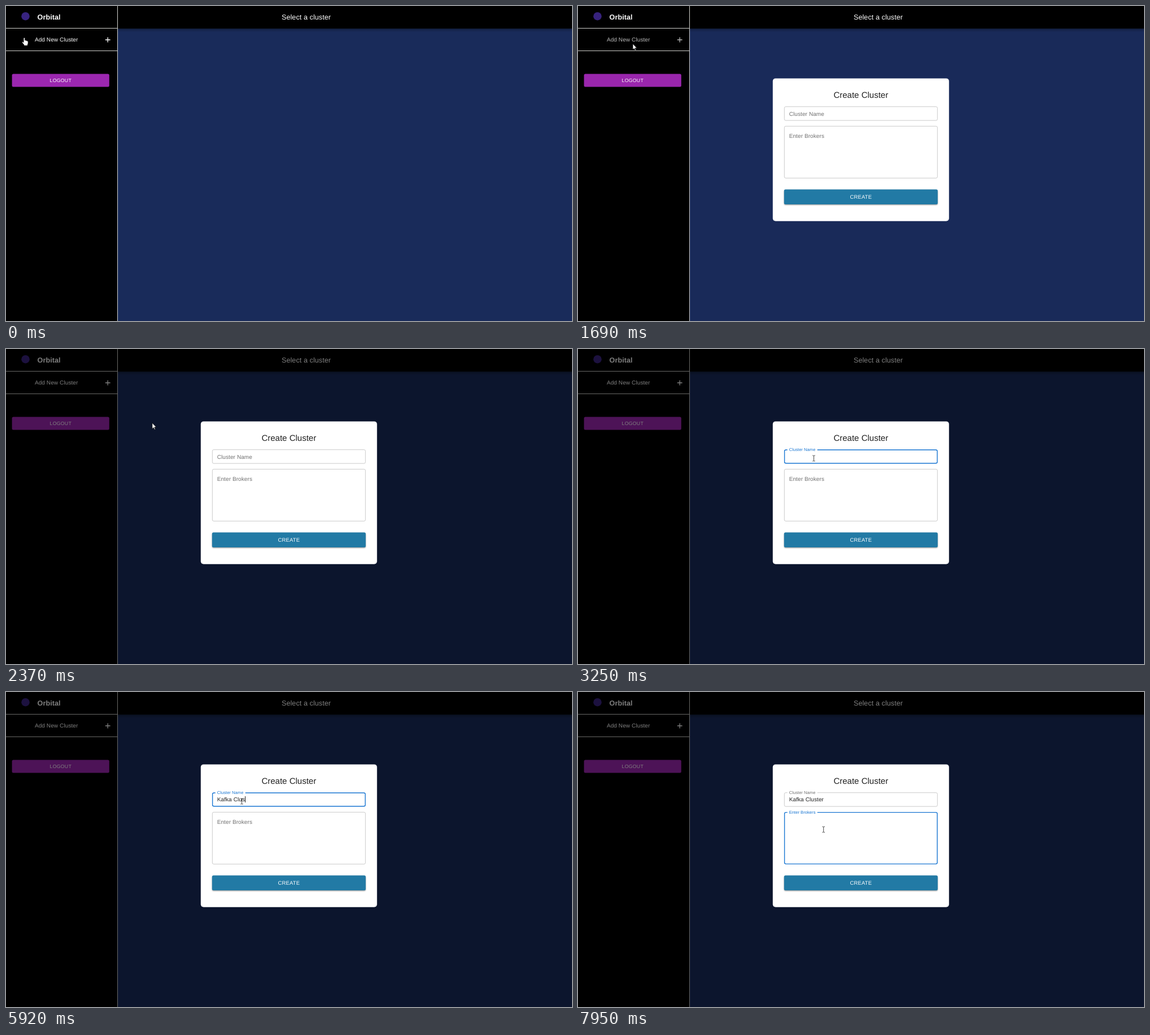
Write an HTML page that moves like this. It is 1002 px wide and 559 px high and loops after 8 s.

```html
<!DOCTYPE html>
<html lang="en">
<head>
<meta charset="utf-8">
<title>Create Cluster</title>
<style>
  html, body { margin: 0; width: 100%; height: 100%; overflow: hidden; background: #000; }
  svg { display: block; width: 1002px; height: 559px; }
  text {
    font: 10.02px "Liberation Sans", Arial, sans-serif;
    letter-spacing: .00938em;
    white-space: pre;
    text-rendering: geometricPrecision;
    fill: #fff;
  }
  .h6 { font-size: 12.52px; letter-spacing: .0075em; }
  .h5 { font-size: 15.02px; letter-spacing: 0; fill: #222; }
  .btn { font-size: 8.76px; letter-spacing: .02857em; text-anchor: middle; }
  .large { font-size: 9.39px; }
  .rule { fill: #d2d2ce; }
  .outline { fill: none; }
  .beam { fill: none; stroke: #333; stroke-width: .9; }
  .pointer { fill: #fff; stroke: #000; stroke-width: .75; stroke-linejoin: round; }
</style>
</head>
<body>
<svg viewBox="0 0 1002 559">
  <defs>
    <linearGradient id="shade" x2="0" y2="1">
      <stop offset="0" stop-opacity=".34"/>
      <stop offset=".5" stop-opacity=".1"/>
      <stop offset="1" stop-opacity="0"/>
    </linearGradient>
    <clipPath id="item"><rect y="40" width="197" height="39"/></clipPath>
    <filter id="soft" x="-5%" y="-30%" width="110%" height="170%"><feGaussianBlur stdDeviation="1"/></filter>
  </defs>

  <rect width="1002" height="559"/>
  <rect x="198" y="40" width="804" height="519" fill="#192b5a"/>
  <rect x="198" y="40" width="804" height="7" fill="url(#shade)"/>
  <rect class="rule" x="197" y="0" width="1" height="559"/>
  <rect class="rule" y="39" width="197" height="1"/>
  <rect class="rule" y="79" width="197" height="1"/>
  <circle cx="34.5" cy="18.2" r="7.3" fill="#38237f"/>
  <text class="h6" x="55.6" y="23.6" font-weight="700" style="font-weight:700">Orbital</text>
  <text class="h6" x="488" y="23.6">Select a cluster</text>
  <text x="50.9" y="63.2">Add New Cluster</text>
  <path d="M175.8 60h8.8M180.2 55.6v8.8" stroke="#fff" stroke-width="1.3"/>
  <circle id="ripple" cx="97" cy="67" clip-path="url(#item)"/>
  <rect x="10.6" y="120.5" width="172.2" height="22.9" rx="2.5" fill="#9c27b0"/>
  <text class="btn" x="96.8" y="134.9">LOGOUT</text>

  <rect id="backdrop" width="1002" height="559"/>

  <g id="modal">
    <rect x="344.8" y="128.4" width="312" height="253.4" rx="5" fill="#fff"/>
    <text class="h5" x="500.8" y="163.4" text-anchor="middle">Create Cluster</text>
    <g id="fields"></g>
    <text id="value" x="373.7" y="194.1" style="fill:#222"></text>
    <rect id="caret" width="1" height="11" fill="#222"/>
    <rect x="365" y="327" width="271.6" height="26" rx="2.5" opacity=".45" filter="url(#soft)"/>
    <rect x="364.8" y="325.6" width="272" height="26.4" rx="2.5" fill="#227aa5"/>
    <text class="btn large" x="500.9" y="342.1">CREATE</text>
  </g>

  <g id="cursor">
    <path id="hand" class="pointer" d="M-1.3 8.2V1Q-1.3 -.1 -.1 -.1T1.1 1V4.7Q1.4 4.1 2.2 4.2T3.1 5.1Q3.5 4.6 4.2 4.8T5 5.8Q5.4 5.4 6 5.6T6.7 6.6V9.6Q6.7 11 5.8 12.2V13.9H-.5V12.6L-3.7 8.6Q-4.3 7.6 -3.5 7.1T-2 7.4Z"/>
    <path id="arrow" class="pointer" d="M0 0V10.6L2.4 8.3L4 12L5.6 11.3L4 7.7H7.3Z"/>
    <path id="beam" class="beam" d="M-2.3 -5H-.6L0 -4.5L.6 -5H2.3M0 -4.5V4.5M-2.3 5H-.6L0 4.5L.6 5H2.3"/>
  </g>
</svg>

<script>
const LOOP = 8000, LEFT = 364.9, WIDTH = 271.8, TEXT_X = 373.7;
const OPEN = 1672, NAME_FOCUS = 2745, BROKERS_FOCUS = 7410, LAST_KEY = 6720;

// Bursts of screen updates: start, end, count
const BURSTS = [
  [0, 0, 1], [70, 810, 10], [1210, 1210, 1], [1350, 2110, 12],
  [2180, 2510, 6], [2710, 2990, 5], [7130, 7610, 8]
];

// Pointer path: time, x, y
const PATH = [
  [0, 32.4, 56.4], [150, 30, 46], [320, 52, 45], [560, 97, 67],
  [810, 92, 59.3], [1210, 97, 60], [1350, 97, 67], [2110, 97, 67],
  [2510, 417.5, 194], [7061, 417.5, 194], [7130, 416.6, 207], [7335, 434.7, 244]
];

const WORDS = "Kafka Cluster";
const KEYS = [3650, 3980, 4250, 4450, 4650, 4850, 5110, 5380, 5720, 5920, 6190, 6390, LAST_KEY];

const $ = id => document.getElementById(id);
const clamp = v => Math.max(0, Math.min(1, v));
const mix = (a, b, p) => a + (b - a) * p;
const show = (el, on) => { el.style.display = on ? "" : "none"; };

function set(el, attrs) {
  for (const k in attrs) el.setAttribute(k, attrs[k]);
  return el;
}

function add(tag, attrs) {
  return $("fields").appendChild(set(document.createElementNS("http://www.w3.org/2000/svg", tag), attrs));
}

function bezier(x1, y1, x2, y2) {
  const at = (a, b, u) => 3 * (1 - u) * (1 - u) * u * a + 3 * (1 - u) * u * u * b + u * u * u;
  return x => {
    x = clamp(x);
    let lo = 0, hi = 1;
    for (let i = 0; i < 20; i++) {
      const u = (lo + hi) / 2;
      if (at(x1, x2, u) < x) lo = u; else hi = u;
    }
    return at(y1, y2, hi);
  };
}
const easeInOut = bezier(.4, 0, .2, 1), easeOut = bezier(0, 0, .2, 1);

function makeField(name, top, height, baseline) {
  const outline = add("rect", { class: "outline", rx: 2.5 });
  const notch = add("rect", { x: 370.7, y: top - 1, height: 3, fill: "#fff" });
  const label = add("text", { x: TEXT_X });
  label.textContent = name;
  return {
    contains: (x, y) => x > LEFT && x < LEFT + WIDTH && y > top && y < top + height,
    draw(shrink, focused, hovered) {
      const line = focused ? 1.4 : .8;
      set(outline, {
        x: LEFT + line / 2, y: top + line / 2,
        width: WIDTH - line, height: height - line,
        stroke: focused ? "#1976d2" : hovered ? "#212121" : "#bdbdbd",
        "stroke-width": line
      });
      notch.setAttribute("width", 53 * shrink);
      label.setAttribute("y", mix(baseline, top + 2.9, shrink));
      label.style.fontSize = mix(10.02, 7.515, shrink) + "px";
      label.style.fill = focused ? "#1976d2" : "#707070";
    }
  };
}
const nameField = makeField("Cluster Name", 178.3, 25.2, 194.6);
const brokersField = makeField("Enter Brokers", 212.9, 92.9, 234);

function snap(t) {
  const [start, end, count] = BURSTS.filter(b => b[0] <= t).pop();
  const step = (end - start) / (count - 1) || 1;
  return Math.min(end, start + Math.floor((t - start + 6) / step) * step);
}

function pointerAt(t) {
  const i = PATH.findIndex(p => p[0] > t);
  if (i < 0) return PATH[PATH.length - 1].slice(1);
  const [t0, x0, y0] = PATH[i - 1], [t1, x1, y1] = PATH[i];
  const p = (t - t0) / (t1 - t0);
  return [mix(x0, x1, p), mix(y0, y1, p)];
}

function render(t) {
  const s = snap(t);
  const open = s >= OPEN;
  const onName = s >= NAME_FOCUS && s < BROKERS_FOCUS;
  const onBrokers = s >= BROKERS_FOCUS;
  const [x, y] = pointerAt(s);

  const grow = easeInOut((s - 1310) / 550);
  set($("ripple"), {
    r: 125 * grow,
    opacity: .27 * clamp(1 - (s - 1750) / 550)
  });
  $("backdrop").setAttribute("opacity", .5 * easeInOut((s - OPEN) / 225));
  show($("modal"), open);

  const overName = open && nameField.contains(x, y);
  const overBrokers = open && brokersField.contains(x, y);
  nameField.draw(easeOut((s - NAME_FOCUS) / 200), onName, overName);
  brokersField.draw(easeOut((s - BROKERS_FOCUS) / 200), onBrokers, overBrokers);

  const value = $("value");
  const typed = WORDS.slice(0, KEYS.filter(k => k <= t).length);
  if (value.textContent !== typed) value.textContent = typed;

  const nameCaret = onName && (t < 3250 || t >= KEYS[0] && t < LAST_KEY + 500);
  const brokersCaret = onBrokers && t < 7950;
  show($("caret"), nameCaret || brokersCaret);
  const advance = nameCaret && typed ? value.getComputedTextLength() : 0;
  set($("caret"), { x: Math.floor(TEXT_X + advance), y: onBrokers ? 225 : 185 });

  const overText = overName || overBrokers;
  show($("hand"), !open);
  show($("arrow"), open && !overText);
  show($("beam"), overText);
  $("cursor").setAttribute("transform", `translate(${x} ${y})`);
}

const begin = performance.now();
function frame() {
  render((performance.now() - begin) % LOOP);
  requestAnimationFrame(frame);
}
frame();
</script>
</body>
</html>
```
